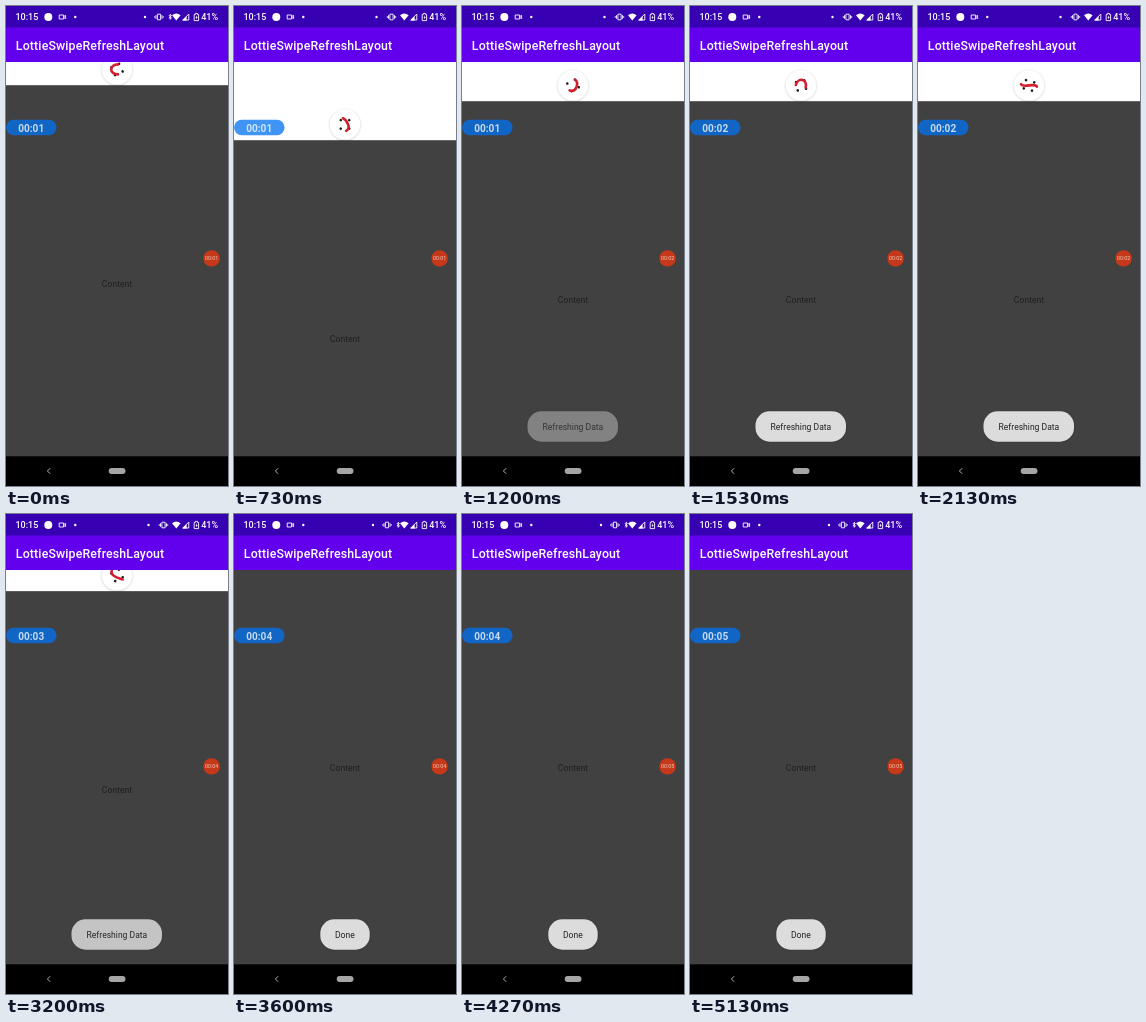
An HTML page that plays this animation: 222 by 480 pixels, repeating every 5.19 s.

```html
<!DOCTYPE html>
<html lang="en">
<head>
<meta charset="utf-8">
<title>Swipe to refresh</title>
<style>
  html, body { margin: 0; width: 100%; height: 100%; overflow: hidden; background: #000; }
  svg { display: block; width: 100%; height: 100%; }
  text { font-family: Roboto, sans-serif; }
  .mid { text-anchor: middle; }
  .medium { font-weight: 500; }
  .bold { font-weight: 700; }
  .line { fill: none; stroke: #fff; stroke-width: .9; }
</style>
</head>
<body>
<svg viewBox="0 0 222 480">
  <defs>
    <filter id="soft" x="-30%" y="-30%" width="160%" height="160%">
      <feGaussianBlur stdDeviation="1.2"/>
    </filter>
  </defs>

  <rect y="55" width="222" height="395" fill="#fff"/>
  <g id="content">
    <rect y="55.2" width="222" height="430" fill="#424142"/>
    <text class="mid" x="111" y="256.6" font-size="8.63" fill="#1f1f1f">Content</text>
  </g>

  <g id="spinner">
    <circle cy=".6" r="15.4" opacity=".17" filter="url(#soft)"/>
    <circle r="15.2" fill="#fff"/>
    <g id="dots" fill="#191919">
      <circle cx="6" r="1.3"/><circle cx="-6" r="1.3"/>
      <circle cy="6" r="1.3"/><circle cy="-6" r="1.3"/>
    </g>
    <path id="snake" fill="none" stroke="#d3202f" stroke-width="2.6" stroke-linecap="round"/>
  </g>

  <rect width="222" height="22" fill="#3700b3"/>
  <rect y="21.5" width="222" height="34.5" fill="#6200ee"/>
  <text class="medium" x="9.8" y="43.8" font-size="12.33" letter-spacing=".154" fill="#fff">LottieSwipeRefreshLayout</text>

  <g fill="#fff">
    <text class="medium" x="9.5" y="14.4" font-size="9">10:15</text>
    <circle cx="42.3" cy="11" r="4"/>
    <path class="line" d="M53.2 9h4.4v4h-4.4zM57.6 10.6l2-1.2v3.2l-2-1.2"/>
    <circle cx="69.3" cy="11" r="1.2"/>
    <circle id="notice" cy="11" r="1.2"/>
    <g id="vibrate" class="line">
      <path d="M-1.6 8.2h3.2v5.6h-3.2zM-3 9.2v3.6M3 9.2v3.6M-4.2 10.2v1.6M4.2 10.2v1.6"/>
    </g>
    <path id="bluetooth" class="line" d="M163 9.2l2.4 2.7-1.2 1.5V8.2l1.2 1.3-2.4 2.7"/>
    <path d="M166 9.2Q170.3 5.8 174.6 9.2L170.3 14.4z"/>
    <path class="line" d="M182.8 8v6h-6z"/>
    <path d="M180.6 10v4.4h-4.4z"/>
    <path class="line" d="M188.2 8.4h1.2V7.4h2v1h1.2v6.2h-4.4z"/>
    <path d="M190.8 9.3l-1.3 2.4h.9v1.9l1.3-2.6h-.9z"/>
    <text class="medium" x="195.2" y="14.4" font-size="9">41%</text>
  </g>

  <rect y="113.8" width="50.6" height="15.4" rx="7.7" fill="#0072f0" fill-opacity=".75"/>
  <text id="clock" class="mid bold" x="25.2" y="125.6" font-size="10.1" fill="#fff" fill-opacity=".76"></text>

  <circle cx="205.6" cy="252.4" r="8.2" fill="#c5391a"/>
  <text id="badge" class="mid" x="205.6" y="254.4" font-size="5.3" fill="#f0cbb8"></text>

  <g id="loading">
    <rect x="65.5" y="405.8" width="90.5" height="30.2" rx="14" opacity=".12" filter="url(#soft)"/>
    <rect x="65.5" y="405.3" width="90.5" height="30.4" rx="14" fill="#dcdcdc"/>
    <text class="mid" x="110.9" y="424" font-size="8.55" fill="#222">Refreshing Data</text>
  </g>
  <g id="done">
    <rect x="86.3" y="405.8" width="49.4" height="30.2" rx="14" opacity=".12" filter="url(#soft)"/>
    <rect x="86.3" y="405.3" width="49.4" height="30.4" rx="14" fill="#dcdcdc"/>
    <text class="mid" x="110.9" y="424" font-size="8.55" fill="#222">Done</text>
  </g>

  <rect y="450.3" width="222" height="30" fill="#000"/>
  <path d="M44.2 462.2l-2.8 2.8 2.8 2.8" fill="none" stroke="#b0b0b0"/>
  <rect x="102.7" y="462" width="16.8" height="6" rx="3" fill="#a5a5a5"/>
</svg>

<script>
const LOOP = 5190, STEP = 200 / 3;
const REST = 24, PULLED = 79, REFRESH = 40, REFRESH_START = 1130;

const $ = id => document.getElementById(id);
const move = (id, x, y) => $(id).setAttribute("transform", `translate(${x} ${y})`);
const show = (id, visible) => $(id).style.display = visible ? "" : "none";

// Progress from 0 to 1 between two times.
const ramp = (t, from, to) => Math.min(1, Math.max(0, (t - from) / (to - from)));
const easeOut = k => 1 - (1 - k) ** 2;
const timer = (t, offset) => "00:0" + (1 + Math.max(0, Math.floor((t - offset) / 1000)));

// A curved stroke: bend 1 is a tight hook, bend 0 a flat wave.
function snakePath(bend) {
  const wave = 4 * (1 - bend), tip = 8 - 3 * bend;
  return `M${-bend} ${-tip}C${8 * bend - wave} -5 ${8 * bend + wave} 5 ${-bend} ${tip}`;
}

function drawSpinner(t, drag, release) {
  const spin = Math.max(0, t - REFRESH_START);
  const bend = spin ? Math.sin(Math.PI / 2 * (t - 2130) / 670) ** 2 : 1 - drag / 2;
  const heading = 180 - 195 * drag + 65 * release - .31 * spin;
  const dots = 20 + 25 * drag + 60 * release + .045 * spin;
  $("dots").setAttribute("transform", `rotate(${dots})`);
  $("snake").setAttribute("transform", `rotate(${heading})`);
  $("snake").setAttribute("d", snakePath(bend));
}

function draw(t) {
  const drag = easeOut(ramp(t, 350, 730));
  const release = easeOut(ramp(t, 880, REFRESH_START));
  const dismiss = easeOut(ramp(t, 3130, 3400));
  const pull = REST + (PULLED - REST) * drag - (PULLED - REFRESH) * release - REFRESH * dismiss;

  move("content", 0, pull);
  move("spinner", 111, 39.4 + pull);
  show("spinner", dismiss < 1);
  drawSpinner(t, drag, release);

  $("loading").style.opacity = ramp(t, 1110, 1325) - ramp(t, 3180, 3310);
  $("done").style.opacity = ramp(t, 3310, 3500);
  $("clock").textContent = timer(t, 400);
  $("badge").textContent = timer(t, 190);

  // Status icons close up while Bluetooth is hidden.
  const bluetooth = t < 500 || t > 3270;
  show("bluetooth", bluetooth);
  move("vibrate", bluetooth ? 153 : 157.5, 0);
  move("notice", bluetooth ? 139 : 142.5, 0);
}

const start = performance.now();
function tick() {
  const t = (performance.now() - start) % LOOP;
  draw(Math.floor((t + 4) / STEP) * STEP);
  requestAnimationFrame(tick);
}
tick();
</script>
</body>
</html>
```
